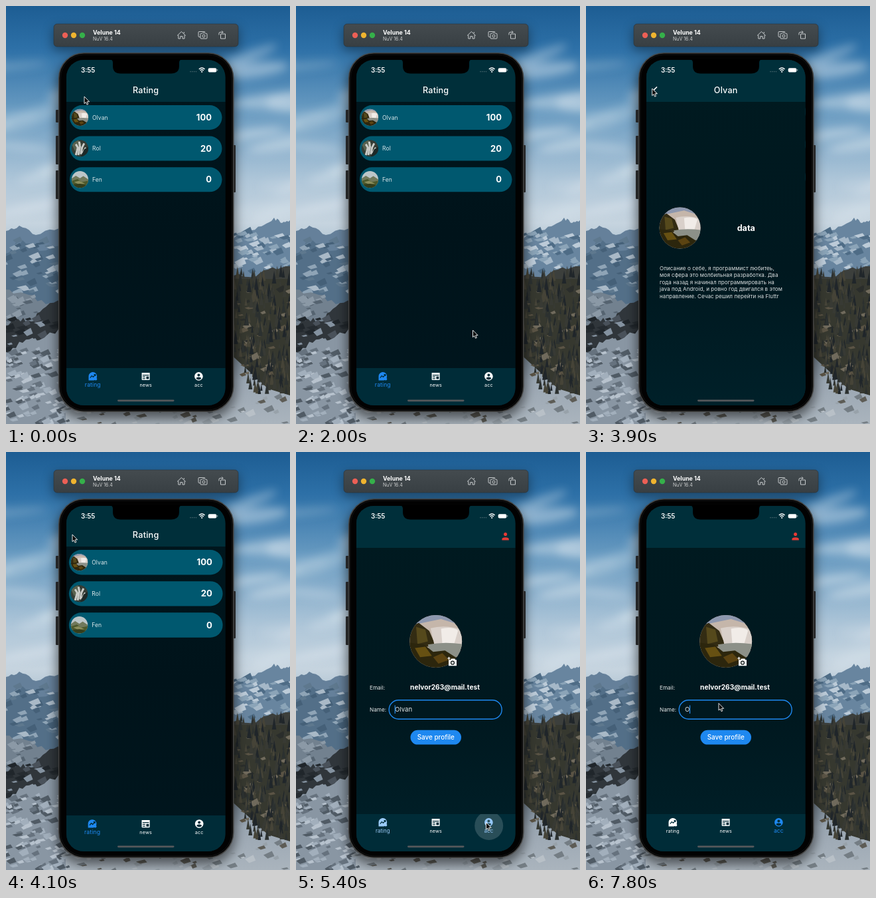
Write an HTML page that moves like this. It is 428x628 px and loops after 8 s.

```html
<!DOCTYPE html>
<html lang="en">
<head>
<meta charset="utf-8">
<title>Rating app</title>
<style>
html, body { margin: 0; width: 100%; height: 100%; overflow: hidden; background: #6f8ba3; }
svg { display: block; position: absolute; left: 0; top: 0; }
text { font-family: Inter, Roboto, sans-serif; white-space: pre; }
</style>
</head>
<body>
<svg id="back" width="428" height="628" viewBox="0 0 428 628"></svg>
<svg id="app" width="428" height="628" viewBox="0 0 428 628"></svg>
<script>
const $ = id => document.getElementById(id);
const BLUE = [30, 136, 240], WHITE = [255, 255, 255];
const NAV = '#002c38';

let seed = 11;
const rnd = (a = 0, b = 1) => {
  seed = (seed * 16807) % 2147483647;
  return a + (b - a) * seed / 2147483647;
};
const many = (n, f) => Array.from({ length: n }, (_, i) => f(i)).join('');
const label = (x, y, size, str, more = '') =>
  `<text x="${x}" y="${y}" font-size="${size}" fill="#fff" ${more}>${str}</text>`;
const box = (x, y, w, h, r, fill, more = '') =>
  `<rect x="${x}" y="${y}" width="${w}" height="${h}" rx="${r}" fill="${fill}" ${more}/>`;
const shape = (d, fill, more = '') => `<path d="${d}" fill="${fill}" ${more}/>`;
const line = (d, stroke, w, more = '') =>
  `<path d="${d}" fill="none" stroke="${stroke}" stroke-width="${w}" ${more}/>`;
const grad = (id, ...stops) => `<linearGradient id="${id}" x2="0" y2="1">` +
  stops.map(([o, c]) => `<stop offset="${o}" stop-color="${c}"/>`).join('') + '</linearGradient>';

// Jagged mountain outline through a few points, closed along the floor
function ridge(points, rough, floor) {
  let d = `M${points[0][0]},${floor}`;
  points.forEach(([x, y], i) => {
    d += `L${x},${y}`;
    const next = points[i + 1];
    if (next) for (let k = 1; k < 5; k++) {
      const f = k / 5;
      d += `L${x + (next[0] - x) * f},${y + (next[1] - y) * f + rnd(-rough, rough)}`;
    }
  });
  return d + `V${floor}Z`;
}

const patches = (n, x0, x1, y0, y1, colors, size) => many(n, i => {
  const x = rnd(x0, x1), y = rnd(y0, y1), w = rnd(size * .4, size), h = w * rnd(.2, .6);
  return shape(`M${x},${y}l${w},${-h}l${w * .3},${h * 1.3}l${-w * .8},${h * .6}z`, colors[i % colors.length]);
});

const clouds = many(36, () => {
  const x = rnd(-30, 450), y = rnd(80, 310);
  return `<ellipse cx="${x}" cy="${y}" rx="${rnd(25, 80)}" ry="${rnd(4, 14)}" fill="#e3ebf1" opacity="${rnd(.15, .5)}" transform="rotate(${rnd(-22, 8)} ${x} ${y})"/>`;
});

const trees = many(230, i => {
  const y = 398 + i * .78, x = rnd(340 + Math.max(0, y - 520) * .55, 432);
  const h = rnd(9, 21), w = h * .17;
  return shape(`M${x},${y - h * .5}l${w},${h}h${-2 * w}z`, ['#20262a', '#2c3130', '#383a34', '#464438'][i % 4]);
});

$('back').innerHTML = `
<defs>
  ${grad('sky', [0, '#1d5d93'], [.1, '#2d70a7'], [.25, '#699bc1'], [.42, '#b0c7d9'], [.52, '#c6d4df'], [.62, '#9db5c8'])}
  ${grad('snow', [0, '#6d7b88'], [.4, '#9aa6b2'], [1, '#aab4bd'])}
  <filter id="soft" x="-30%" y="-100%" width="160%" height="300%"><feGaussianBlur stdDeviation="7"/></filter>
  <filter id="shade" x="-20%" y="-20%" width="140%" height="140%"><feGaussianBlur stdDeviation="8"/></filter>
</defs>
<rect width="428" height="628" fill="url(#sky)"/>
<g filter="url(#soft)">${clouds}</g>
${shape(ridge([[0, 338], [20, 330], [45, 344], [80, 334], [120, 345]], 3, 500), '#65809a')}
${shape(ridge([[0, 372], [25, 352], [50, 368], [100, 356]], 4, 500), '#536f88')}
${patches(45, -8, 78, 345, 440, ['#8fa4b6', '#456078', '#a9b9c7', '#5e788e'], 15)}
${shape(ridge([[0, 426], [28, 432], [60, 448], [100, 452]], 4, 520), '#72818f')}
${patches(22, -8, 75, 435, 475, ['#8b99a6', '#556370'], 14)}
${shape(ridge([[330, 352], [360, 343], [385, 331], [404, 318], [416, 326], [428, 322]], 3, 500), '#68859f')}
${patches(50, 338, 425, 335, 398, ['#bccbd8', '#8ba4b8', '#4e6c86', '#a5b8c8'], 15)}
${shape(ridge([[330, 402], [365, 407], [395, 396], [428, 391]], 4, 600), '#3c3f3c')}
<rect y="520" width="428" height="108" fill="url(#snow)"/>
${shape('M335,410H428V585L395,575L335,520Z', '#36382f')}
${patches(40, 340, 425, 425, 560, ['#5b5445', '#2a2d2b', '#706a5c'], 12)}
${trees}
${shape(ridge([[0, 480], [18, 470], [38, 474], [60, 452], [90, 440]], 4, 540), '#30363b')}
${patches(40, -8, 80, 468, 530, ['#20262b', '#49515a', '#8492a0', '#252b30'], 15)}
${shape(ridge([[0, 520], [25, 506], [50, 502], [90, 480]], 5, 628), '#8996a3')}
${patches(120, -10, 90, 515, 626, ['#b7c2cd', '#66727e', '#a2afbc', '#505b65'], 13)}
${patches(75, 80, 420, 585, 628, ['#b8c0c7', '#747d84', '#98a2aa', '#5d5c56'], 13)}
<g filter="url(#shade)">
  ${box(76, 76, 270, 544, 42, '#000', 'opacity=".5"')}
  ${box(70, 32, 282, 36, 8, '#000', 'opacity=".35"')}
</g>`;

// Photos drawn in a unit circle
const photo = (id, fill, inner) =>
  `<g id="${id}"><circle r="1" fill="${fill}"/><g clip-path="url(#unit)">${inner}</g></g>`;

const photos =
  photo('falls', '#c5b6aa',
    shape('M-1,-1H1V-.6L.2,-.85L-1,-.6Z', '#8d97ae') +
    shape('M-1,-.55L-.65,-.7L-.25,-.4L-.1,-.05L.1,.2H-1Z', '#332c13') +
    shape('M-.75,-.55L-.4,-.45L-.3,0L-.7,.1Z', '#55491c') +
    shape('M-.2,-.5Q.35,-.65 1,-.45V.15H-.05Z', '#d9d0ca') +
    shape('M.2,-.48Q.6,-.58 .85,-.42L.7,.1H.25Z', '#f1ece8') +
    shape('M-.3,.12Q.3,0 1,.1V.65H-.2Z', '#8c9088') +
    shape('M-1,.05L-.45,.12L-.1,.4L.35,.35L.75,.6L1,.55V1H-1Z', '#2c260d') +
    shape('M-.8,.25L-.4,.2L-.15,.55L-.6,.6Z', '#665012') +
    shape('M-.1,.6L.25,.45L.5,.7L.1,.85Z', '#5b4312')) +
  photo('rocks', '#343c35',
    shape('M-1,-.5L-.2,-1L.2,-.5L-.6,.3Z', '#59624f') +
    line('M-.5,.8L-.25,-.1L-.5,-.5M-.2,.8L0,-.2L-.1,-.8M.1,.7L.25,-.1L.5,-.6M.3,.6L.7,-.1', '#c9cbc7', .24) +
    shape('M.5,.1L1,-.2V1H.1Z', '#1d2928')) +
  photo('hills', '#bcc6c8',
    shape('M-1,-.1L-.5,-.45L0,-.15L.4,-.4L1,0V1H-1Z', '#71795b') +
    shape('M-1,.2L-.3,-.05L.2,.3L1,.15V1H-1Z', '#4d592c') +
    shape('M-.7,.3L-.1,.15L.6,.5L-.2,.55Z', '#8a8d5c') +
    shape('M-1,.6L0,.5L1,.75V1H-1Z', '#333d1c'));

const pic = (id, x, y, r) => `<use href="#${id}" transform="translate(${x} ${y}) scale(${r})"/>`;
const mid = 'text-anchor="middle"';
const header = title => box(71, 61, 280, 83, 0, '#002f3a') + label(210.7, 131.2, 12.6, title, mid + ' font-weight="500" letter-spacing=".2"');

const row = (y, id, name, score) =>
  box(96, y, 229.5, 37, 18.5, '#00586f') + pic(id, 111.5, y + 18.3, 12.6) +
  label(130, y + 21.6, 8.5, name, 'fill-opacity=".86" letter-spacing=".1"') +
  label(310, y + 23, 13, score, 'font-weight="700" text-anchor="end"');

const person = 'M0,-1a2.6,2.6 0 1 0 -.01,0zM-5.2,5.2V3.6Q-5.2,1 0,1T5.2,3.6V5.2Z';
const icons = [
  `<path d="M-6.3,6V0A6.3,6.3 0 1 1 3.4,5.3L1.5,6Z"/><circle cx="4.4" cy="4" r="2"/>` +
    line('M-4,2.2L-1.5,-.8L.6,1L4,-2.8M1.6,-2.8H4V-.4', NAV, 1.3),
  `<path d="M-6,-5.5H6V4.6Q6,5.6 5,5.6H-5Q-6,5.6 -6,4.6Z"/>` +
    shape('M-4.7,-2.4H4.7V-1.2H-4.7ZM-4.7,.2H-.7V1.4H-4.7ZM-4.7,2.9H-.7V4.1H-4.7ZM.8,.2H4.7V4.1H.8Z', NAV),
  `<circle r="6.3"/><circle cy="-2" r="2" fill="${NAV}"/>` + shape('M-3.9,3Q-3.5,1 0,1T3.9,3Q2.4,5 0,5T-3.9,3Z', NAV)
];
const tabs = ['rating', 'news', 'acc'].map((name, i) =>
  `<g id="tab${i}"><g transform="translate(${130.8 + i * 79.8} 556.4)">${icons[i]}</g>` +
  `<text x="${130.8 + i * 79.8}" y="572" ${mid} letter-spacing=".1">${name}</text></g>`).join('');

const about = ['Описание о себе, я программист любитеь,', 'моя сфера это молбильная разработка. Два',
  'года назад я начинал программировать на', 'java под Android, и ровно год двигался в этом',
  'направление. Сечас решил перейти на Fluttr'];

const user = 'Olvan';

$('app').innerHTML = `
<defs>
  <clipPath id="unit"><circle r="1"/></clipPath>
  <clipPath id="screen">${box(91, 81, 239.5, 519, 26, '#000')}</clipPath>
  <clipPath id="bar">${box(71, 544, 280, 80, 0, '#000')}</clipPath>
  ${grad('tool', [0, '#444b4f'], [1, '#383f43'])}
  ${grad('list', [0, '#00171e'], [.5, '#00131a'], [1, '#00161e'])}
  ${grad('deep', [0, '#001a20'], [.6, '#00181f'], [1, '#00212a'])}
  ${photos}
</defs>
${box(72, 27, 278, 34, 5, 'url(#tool)', 'stroke="#2b3033" stroke-width=".6"')}
${['#ec5f55', '#efb42f', '#35b04a'].map((c, i) => `<circle cx="${89 + i * 13}" cy="44" r="4.2" fill="${c}"/>`).join('')}
${label(131, 43, 8.8, 'Velune 14', 'font-weight="700"')}
${label(131, 52.2, 7, 'NuV 16.4', 'fill-opacity=".75"')}
<g fill="none" stroke="#c6cacc" stroke-width="1">
  <path d="M258,44.5L264.4,38.5L270.8,44.5M259.8,43.5V49H262.8V45.5H266V49H269V43.5M268.3,41V39"/>
  <path d="M292.5,46.5H291Q290,46.5 290,45.5V39.5Q290,38.5 291,38.5H299Q300,38.5 300,39.5"/>
  <path d="M293,42.3Q293,41.3 294,41.3H295.5L296.5,40.3H299.5L300.5,41.3H302Q303,41.3 303,42.3V48Q303,49 302,49H294Q293,49 293,48Z"/>
  <circle cx="298" cy="45" r="2"/>
  <path d="M323.5,42H330.5V49H323.5ZM321,43.5V41Q321,39.3 323,39.3H327M325.2,37.3L327.2,39.3L325.2,41.3"/>
</g>
${[[75, 156, 19], [75, 195, 43], [75, 247, 43], [341, 209, 71]].map(([x, y, h]) => box(x, y, 5, h, 1, '#242526')).join('')}
${box(79.7, 70.7, 263, 538.6, 38, '#000', 'stroke="#434342" stroke-width="1.6"')}
${box(82, 73, 258.4, 534, 36, '#020202', 'stroke="#151515" stroke-width="1"')}
<g clip-path="url(#screen)">
  ${box(91, 81, 240, 519, 0, '#00141b')}
  <g id="main">
    <g id="listPage">
      ${box(71, 61, 280, 560, 0, 'url(#list)')}
      ${header('Rating')}
      ${row(149, 'falls', user, 100)}${row(195.6, 'rocks', 'Rol', 20)}${row(242.3, 'hills', 'Fen', 0)}
    </g>
    <g id="accPage">
      ${box(71, 61, 280, 560, 0, 'url(#deep)')}
      ${header('')}
      ${shape(person, '#e53a35', 'transform="translate(315.6 127.2)"')}
      ${pic('falls', 210.7, 284.5, 39.5)}
      <g transform="translate(236 315.5)" fill="#fff">
        <path d="M-6,-3.2H-3L-2,-5H3L4.2,-3.2H6V5.8H-6Z"/>
        <circle cy="1.2" r="3.1" fill="#172020"/><circle cy="1.2" r="1.8"/>
        <path d="M-7.6,-5.6H-3.4M-5.5,-7.7V-3.5" stroke="#fff" stroke-width="1.2"/>
      </g>
      ${label(111, 356.7, 8.2, 'Email:', 'fill-opacity=".9"')}
      ${label(224.5, 357.2, 10.2, 'nelvor263@mail.test', mid + ' font-weight="700"')}
      ${label(111, 389.7, 8.2, 'Name:', 'fill-opacity=".9"')}
      ${box(140.2, 372.7, 170, 28.6, 14.3, 'none', 'stroke="#1e88f0" stroke-width="1.4"')}
      ${label(149, 390.2, 9.6, user, 'id="name" fill-opacity=".9"')}
      <rect id="caret" y="380.5" width="1.2" height="12.5" fill="#2b8fee"/>
      ${box(172.5, 417.8, 76.5, 21.8, 10.9, '#1e88f0')}
      ${label(210.7, 432.3, 9.9, 'Save profile', mid + ' font-weight="500"')}
    </g>
    ${box(71, 544, 280, 80, 0, NAV)}
    ${tabs}
    <circle id="ripple" cx="290.7" cy="561.5" fill="#fff" clip-path="url(#bar)"/>
  </g>
  <g id="detail">
    ${box(71, 61, 280, 560, 0, 'url(#deep)')}
    ${header(user)}
    ${line('M107,121.5L101.5,126.8L107,132', '#fff', 1.6)}
    ${pic('falls', 141.6, 333.5, 31)}
    ${label(241.3, 337.8, 12.6, 'data', mid + ' font-weight="700"')}
    ${about.map((s, i) => label(111, 396.8 + i * 10.45, 8, s, 'fill-opacity=".88" letter-spacing=".1"')).join('')}
  </g>
</g>
${shape('M157,80H265Q261,81 261,85V90Q261,101.5 249,101.5H173Q161,101.5 161,90V85Q161,81 157,80Z', '#000')}
${label(113, 99.7, 9.8, '3:55', 'font-weight="600"')}
${many(4, i => `<circle cx="${278 + i * 2.8}" cy="98.6" r=".8" fill="#4d6a72"/>`)}
${line('M290.8,95Q295.2,91.2 299.6,95M292.6,97Q295.2,94.7 297.8,97', '#fff', 1.4)}
<circle cx="295.2" cy="98.8" r="1.1" fill="#fff"/>
${box(304.7, 93.2, 12.6, 6.2, 2, '#fff')}${box(318.2, 95, 1, 2.6, .5, '#9fb0b5')}
${box(168, 591.4, 85.5, 2.8, 1.4, '#56585b')}
<path id="pointer" d="M0,0V10.6L2.4,8.5L4,12.2L5.8,11.4L4.2,7.8H7.6Z" fill="#050505" stroke="#fff" stroke-width=".9" stroke-linejoin="round"/>`;

const path = [[0, 118, 136], [800, 150, 262], [950, 150, 262], [1500, 222, 345], [2000, 266.5, 487], [2150, 266.5, 487],
  [2650, 230, 310], [3000, 191, 163.5], [3250, 191, 163.5], [3750, 99.5, 124], [4130, 100, 124], [4400, 137, 576],
  [4550, 137, 576], [4900, 304, 570], [5100, 286.5, 556.5], [5450, 286.5, 556.5], [6200, 200, 377.5], [8000, 200, 377.5]];

const clamp = v => Math.max(0, Math.min(1, v));
const span = (t, a, b) => clamp((t - a) / (b - a));
const mix = (a, b, k) => a + (b - a) * k;
const smooth = k => k * k * (3 - 2 * k);
// Quick start with a long, slow settle
const zoomEase = p => p < 1 / 6 ? .4 * (6 * p) ** 2 : 1 - .6 * (1 - (p * 6 - 1) / 5) ** 4;
const set = (id, attrs) => { for (const k in attrs) $(id).setAttribute(k, attrs[k]); };
const show = (id, on) => { $(id).style.display = on ? '' : 'none'; };
const zoom = s => `translate(211 340.5) scale(${s}) translate(-211 -340.5)`;

function drawPages(t) {
  const open = span(t, 3061, 3361), close = span(t, 3960, 4260);
  const closing = t >= 3960;
  const mainScale = closing ? mix(1.1, 1, zoomEase(close)) : mix(1, 1.05, zoomEase(open));
  const detailScale = closing ? mix(1, .9, zoomEase(close)) : mix(.85, 1, zoomEase(open));
  const alpha = closing ? 1 - span(close, .0825, .2075) : span(open, .125, .25);
  set('main', { transform: zoom(mainScale) });
  set('detail', { transform: zoom(detailScale), opacity: alpha });
  show('detail', alpha > 0);
  show('listPage', t < 5300);
  show('accPage', t >= 5300);
}

function drawTabs(t) {
  const k = span(t, 5300, 5480);
  [1 - k, 0, k].forEach((on, i) => {
    const fill = `rgb(${WHITE.map((c, n) => Math.round(mix(c, BLUE[n], on)))})`;
    set('tab' + i, { fill, 'font-size': mix(7.2, 8.6, on) });
  });
  set('ripple', {
    r: mix(10, 21.5, span(t, 5290, 5400)),
    opacity: t < 5290 ? 0 : .16 * (1 - span(t, 5450, 5700))
  });
}

function drawField(t) {
  if (t < 5300) return;
  const erased = t < 6600 ? 0 : Math.min(4, Math.floor((t - 6600) / 100) + 1);
  const name = $('name');
  name.textContent = user.slice(0, user.length - erased);
  const x = 148.6 + (t < 6100 ? 0 : name.getComputedTextLength());
  set('caret', { x, opacity: 1 - span(t, 7200, 7400) + span(t, 7600, 7800) });
}

function drawPointer(t) {
  const i = path.findIndex(p => p[0] > t);
  const [a, b] = [path[i - 1], path[i]];
  const k = smooth(span(t, a[0], b[0]));
  set('pointer', { transform: `translate(${mix(a[1], b[1], k)} ${mix(a[2], b[2], k)})` });
}

function frame() {
  const t = performance.now() % 8000;
  drawPages(t);
  drawTabs(t);
  drawField(t);
  drawPointer(t);
  requestAnimationFrame(frame);
}
frame();
</script>
</body>
</html>
```
